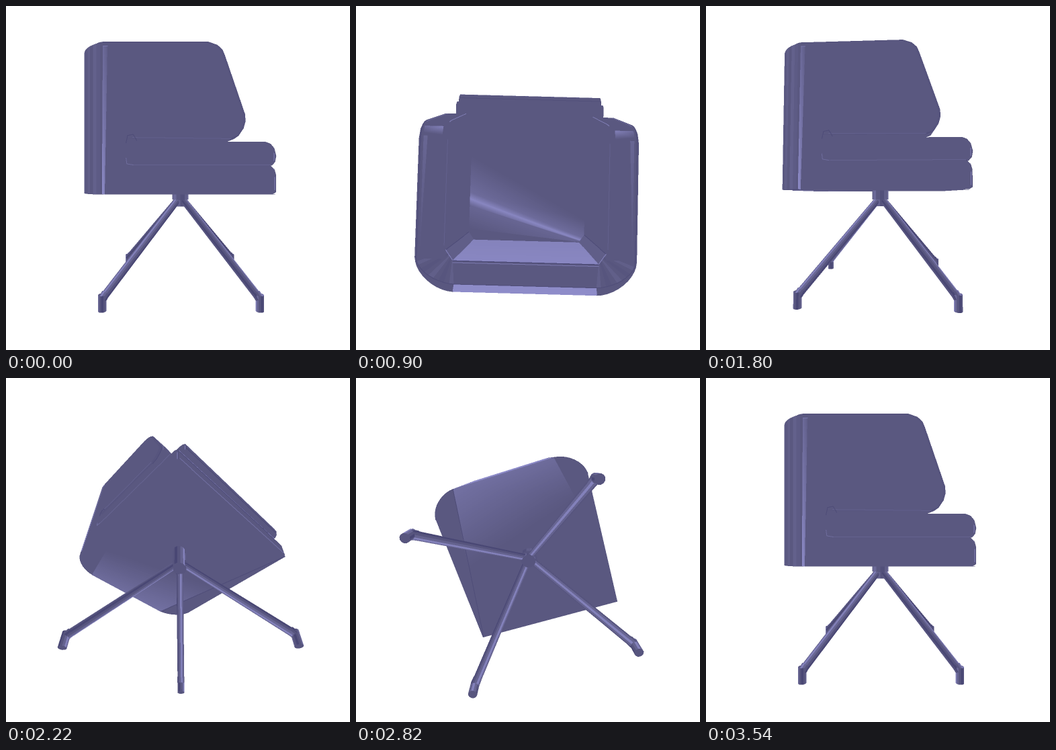
Animation of 512x512 px, one loop 3.6 s. Source, as an HTML page with a canvas:

```html
<!DOCTYPE html>
<html lang="en">
<head>
<meta charset="utf-8">
<title>Turning chair</title>
<style>
html, body { margin: 0; width: 100%; height: 100%; overflow: hidden; background: #fff; }
canvas { display: block; width: 512px; height: 512px; }
</style>
</head>
<body>
<canvas id="stage" width="512" height="512"></canvas>
<script>
const SIZE = 512, SS = 2, W = SIZE * SS;
const FOCAL = W / 2 / Math.tan(Math.PI / 6);
const LOOP = 3600, STEP = 60, LAST = LOOP / STEP - 1;

const view = document.getElementById('stage').getContext('2d');
const big = document.createElement('canvas');
big.width = big.height = W;
const bigCtx = big.getContext('2d');
const image = bigCtx.createImageData(W, W);
const pixels = new Uint32Array(image.data.buffer);
const near = new Float32Array(W * W);

// Shades run from -1 (dark edge) over 0 (body) to 1 (lit panel)
const DARK = [62, 60, 108], BODY = [90, 88, 128], LIT = [145, 143, 205];
const ramp = new Uint32Array(201);
for (let i = 0; i <= 200; i++) {
  const s = (i - 100) / 100, end = s < 0 ? DARK : LIT;
  const [r, g, b] = BODY.map((c, k) => Math.round(c + (end[k] - c) * Math.abs(s)));
  ramp[i] = (255 << 24 | b << 16 | g << 8 | r) >>> 0;
}

const tris = [], lines = [];

function poly(pts, shade) {
  const at = i => Array.isArray(shade) ? shade[i] : shade;
  for (let i = 1; i < pts.length - 1; i++)
    tris.push([pts[0], pts[i], pts[i + 1], at(0), at(i), at(i + 1)]);
}

function line(pts, shade, width = 1) {
  for (let i = 1; i < pts.length; i++) lines.push([pts[i - 1], pts[i], shade, width]);
}

// Joins two profiles of (x, y) points at depths z0 and z1
function band(from, to, z0, z1, shade) {
  from.forEach(([x, y], i) => {
    const j = (i + 1) % from.length;
    poly([[x, y, z0], [...from[j], z0], [...to[j], z1], [...to[i], z1]], shade);
  });
}

function slab(profile, z0, z1, shade) {
  for (const z of [z0, z1]) poly(profile.map(p => [...p, z]), shade);
  band(profile, profile, z0, z1, shade);
}

function tube(a, b, r, shades, closed) {
  const sub = (p, q) => p.map((v, i) => v - q[i]);
  const cross = (p, q) => [p[1] * q[2] - p[2] * q[1], p[2] * q[0] - p[0] * q[2], p[0] * q[1] - p[1] * q[0]];
  const unit = p => p.map(v => v / Math.hypot(...p));
  const axis = unit(sub(b, a));
  const side = unit(cross(axis, Math.abs(axis[1]) > 0.95 ? [1, 0, 0] : [0, 1, 0]));
  const up = cross(side, axis), n = 12;
  const ring = c => Array.from({ length: n }, (_, i) => {
    const t = i / n * 2 * Math.PI;
    return c.map((v, k) => v + r * (Math.cos(t) * side[k] + Math.sin(t) * up[k]));
  });
  const p = ring(a), q = ring(b);
  for (let i = 0; i < n; i++) {
    const j = (i + 1) % n;
    poly([p[i], p[j], q[j], q[i]], shades[i % shades.length]);
  }
  if (closed) poly(q, -0.1);
}

const TOP = 0.349, FLOOR = -0.042, OUT = 0.243, IN = 0.174, SHOULDER = TOP - 0.006;
const BACK = -0.262, BEND = -0.19, PANEL = 0.158, INNER = -0.193;

function buildArm(k) {
  const nose = [[0.135, 0.1], [0.155, 0.108], [0.168, 0.127], [0.173, 0.145], [0.172, 0.163],
    [0.12, 0.315], [0.114, 0.329], [0.101, 0.341], [0.078, TOP]];
  const profile = [[BEND, 0.1], ...nose, [BEND, TOP]];
  const inset = profile.map(([x, y]) => [BEND + (x - BEND) * 0.98, 0.1 + (y - 0.1) * 0.98]);
  const rim = OUT - 0.006;
  slab(profile, k * IN, k * rim, 0);
  band(profile, inset, k * rim, k * OUT, -0.1);
  poly(inset.map(p => [...p, k * OUT]), 0);
  slab([[BEND, FLOOR], [-0.13, FLOOR], [-0.13, 0.1], [BEND, 0.1]], k * IN, k * OUT, 0);

  const edge = (z, from, to) => nose.slice(from, to).map(([x, y]) => [x, y, k * z]);
  line(edge(rim, 0, 9), -0.4);
  line(edge(IN + 0.006, 1, 7), 0.7);
  line(edge(rim - 0.006, 3, 7), 0.35);
  // Glints where the top rolls over into the front
  poly([[0.101, 0.342, k * 0.19], [0.101, 0.342, k * 0.232], [0.085, 0.3475, k * 0.232],
    [0.08, 0.349, k * 0.19]], [0.75, 0.35, 0, 0]);
  poly([[0.078, TOP + 0.0005, k * 0.222], [0.078, TOP + 0.0005, k * 0.231],
    [BEND, TOP + 0.0005, k * 0.231]], [0.25, 0.25, 0]);
  line([[-0.16, TOP, k * (IN + 0.004)], [0.07, TOP, k * (IN + 0.004)]], 0.15);
  line([[BEND, TOP, k * rim], [0.078, TOP, k * rim]], -0.35);
  line([[-0.115, 0.103, k * OUT], [0.135, 0.1, k * OUT]], 0.15);
  line([[-0.105, 0.096, k * OUT], [-0.114, 0.111, k * OUT], [-0.128, 0.108, k * OUT],
    [-0.132, 0.09, k * OUT]], -0.4);
  line([[-0.132, 0.05, k * OUT], [-0.13, 0.036, k * OUT], [-0.113, 0.033, k * OUT]], 0.35);

  const z = k * (OUT + 0.0007);
  poly([[BEND - 0.001, 0.335, z], [BEND + 0.011, 0.335, z], [BEND + 0.004, FLOOR, z],
    [BEND - 0.003, FLOOR, z]], [0.35, 0.1, 0.7, 1]);
  line([[BEND, 0.335, z], [BEND + 0.011, 0.335, z]], 0.5);
}

function buildBack() {
  const n = 10;
  const corner = k => Array.from({ length: n + 1 }, (_, i) => {
    const t = i / n * Math.PI / 2, bow = v => Math.pow(Math.max(v, 0), 1.15);
    return [BEND + (BACK - BEND) * bow(Math.sin(t)), k * (PANEL + (OUT - PANEL) * bow(Math.cos(t)))];
  });
  const at = ([x, z], y) => [x, y, z];
  // The flat top is a little smaller than the shell below it
  const shrink = ([x, z]) => [BEND + (x - BEND) * 0.74, z * 0.977];
  for (const k of [1, -1]) {
    const arc = corner(k), lid = arc.map(shrink);
    const inside = i => [-0.17 + (INNER + 0.17) * i / n, k * (IN + (PANEL - IN) * i / n)];
    for (let i = 0; i < n; i++) {
      const a = arc[i], b = arc[i + 1], c = inside(i), d = inside(i + 1), j = i + 1;
      poly([at(a, FLOOR), at(b, FLOOR), at(b, SHOULDER), at(a, SHOULDER)], [0, 0.06, 0.16, 0, 0.1][i % 5]);
      poly([at(a, SHOULDER), at(b, SHOULDER), at(lid[j], TOP), at(lid[i], TOP)], -0.05);
      poly([at(lid[i], TOP), at(lid[j], TOP), at(d, TOP), at(c, TOP)], [0, 0.12, 0, -0.1][i % 4]);
    }
    poly([at(lid[0], TOP), [-0.17, TOP, k * 0.237], [-0.17, TOP, k * IN]], 0);
    poly([[-0.17, 0.05, k * IN], [INNER, 0.05, k * PANEL], [INNER, TOP, k * PANEL], [-0.17, TOP, k * IN]], 0.1);
    line([[INNER, TOP, k * PANEL], [INNER, 0.1, k * PANEL]], 0.8);
    line([[-0.17, TOP, k * IN], [-0.17, 0.1, k * IN]], -0.4);
    line([[-0.17, TOP, k * IN], [INNER, TOP, k * PANEL]], 0.7);
    line(lid.map(p => at(p, TOP)), -0.35);
    line(arc.map(p => at(p, FLOOR)), -0.3);
    line([[BACK, SHOULDER, k * PANEL], [BACK, FLOOR, k * PANEL]], -0.5);
  }
  const wall = (x, top) => [[x, FLOOR, -PANEL], [x, FLOOR, PANEL], [x, top, PANEL], [x, top, -PANEL]];
  poly(wall(BACK, SHOULDER), [0.9, 0.78, 1, 1]);
  poly(wall(INNER, TOP), [0.75, 0.75, 0.85, 0.85]);
  const [lip, end] = shrink([BACK, PANEL]);
  poly([[BACK, SHOULDER, -PANEL], [BACK, SHOULDER, PANEL], [lip, TOP, end], [lip, TOP, -end]], 0.95);
  poly([[lip, TOP, -end], [lip, TOP, end], [INNER, TOP, PANEL], [INNER, TOP, -PANEL]], 0);
  line([[INNER, TOP, -PANEL], [INNER, TOP, PANEL]], -0.6);
  line([[INNER - 0.004, TOP, -PANEL], [INNER - 0.004, TOP, PANEL]], 0.6);
  line([[lip, TOP, -end], [lip, TOP, end]], -0.4);

  const under = [[0.25, 0.241], ...corner(1), ...corner(-1).reverse(), [0.25, -0.241]];
  poly(under.map(p => at(p, FLOOR)), 0);
  const y = FLOOR - 0.001;
  poly([[BACK, y, -PANEL], [BACK, y, PANEL], [-0.13, y, 0.19], [-0.01, y, -0.2]], [0.45, 0.35, 0, 0]);
  line([[BACK, y, -PANEL], [0.25, y, -0.238]], -0.35);
}

function buildSeat() {
  const cushion = [[-0.2, 0.033], [0.247, 0.033], [0.255, 0.042], [0.258, 0.058],
    [0.253, 0.078], [0.243, 0.09], [0.23, 0.095], [-0.2, 0.095]];
  const base = [[-0.2, -0.041], [0.242, -0.041], [0.25, -0.036], [0.25, 0.008],
    [0.246, 0.022], [0.235, 0.032], [-0.2, 0.032]];
  const soft = 0.218, hard = 0.241;
  slab(cushion, -soft, soft, 0);
  slab(base, -hard, hard, 0);

  const across = (x, y, z, s) => line([[x, y, -z], [x, y, z]], s);
  across(0.255, 0.074, soft, 0.6);
  across(0.238, 0.093, soft, -0.3);
  across(0.257, 0.045, soft, -0.5);
  across(0.246, 0.022, 0.238, 0.7);
  across(0.251, 0.005, 0.238, -0.4);
  across(0.251, -0.03, 0.238, 0.4);
  for (const k of [1, -1]) {
    const zs = k * (soft + 0.001), zh = k * (hard + 0.001);
    line([[-0.11, 0.033, zh], [0.235, 0.033, zh]], 0.2);
    line(cushion.slice(2, 7).map(p => [...p, zs]), -0.4);
    line(base.slice(2, 6).map(p => [...p, zh]), -0.4);
    line([[0.246, -0.03, zh], [0.246, 0.002, zh]], 0.7);
    line([[0.252, 0.046, zs], [0.252, 0.065, zs]], 0.7);
  }

  // A slanting sheen across the seat: offset along x, shade
  const sheen = [[-0.09, 0], [-0.02, 0.25], [0, 0.85], [0.02, 0.35], [0.13, 0]];
  const y = 0.0957;
  const row = d => [[-0.07 + d, y, -IN], [Math.max(-0.19 + d * 0.5, INNER), y, IN]];
  for (let i = 1; i < sheen.length; i++) {
    const [d, s] = sheen[i - 1], [e, t] = sheen[i];
    poly([...row(d), ...row(e).reverse()], [s, s, t, t]);
  }
}

function buildLegs() {
  const x0 = 0.008, spread = 0.209;
  const stripes = [-0.6, -0.1, 0.2, 0.75, 0.25, -0.1];
  tube([x0, FLOOR, 0], [x0, -0.072, 0], 0.027, [-0.3, 0.1, 0.3, 0], true);
  tube([x0, -0.07, 0], [x0, -0.094, 0], 0.021, [-0.2, 0, 0.2], true);
  for (const i of [1, -1]) for (const k of [1, -1]) {
    const to = (d, y) => [x0 + i * d, y, k * d];
    tube(to(0.012, -0.077), to(spread - 0.006, -0.313), 0.0108, stripes);
    tube(to(spread - 0.008, -0.308), to(spread, -0.322), 0.0115, stripes, true);
    tube(to(spread, -0.31), to(spread, -0.353), 0.0112, stripes, true);
  }
}

for (const k of [1, -1]) buildArm(k);
buildBack();
buildSeat();
buildLegs();

// The camera turns and climbs by the same angle; past the pole it stays upright
function camera(angle) {
  let turn = angle, tilt = angle;
  if (Math.cos(tilt) < 0) { turn += Math.PI; tilt = Math.PI - tilt; }
  const ct = Math.cos(turn), st = Math.sin(turn), ce = Math.cos(tilt), se = Math.sin(tilt);
  return ([x, y, z]) => {
    const right = x * ct - z * st, toward = x * st + z * ct;
    const inv = 1 / (1 - toward * ce - y * se);
    return [W / 2 + FOCAL * right * inv, W / 2 - FOCAL * (y * ce - toward * se) * inv, inv];
  };
}

const tone = s => ramp[Math.max(0, Math.min(200, Math.round(100 + s * 100)))];

function fill(a, b, c, sa, sb, sc) {
  const area = (b[0] - a[0]) * (c[1] - a[1]) - (b[1] - a[1]) * (c[0] - a[0]);
  if (Math.abs(area) < 1e-6) return;
  const lo = k => Math.max(0, Math.floor(Math.min(a[k], b[k], c[k])));
  const hi = k => Math.min(W - 1, Math.ceil(Math.max(a[k], b[k], c[k])));
  const x0 = lo(0), x1 = hi(0), y1 = hi(1), flat = sa === sb && sb === sc, ink = tone(sa);
  for (let y = lo(1); y <= y1; y++) {
    const py = y + 0.5;
    for (let x = x0; x <= x1; x++) {
      const px = x + 0.5;
      const u = ((b[0] - px) * (c[1] - py) - (b[1] - py) * (c[0] - px)) / area;
      if (u < 0) continue;
      const v = ((c[0] - px) * (a[1] - py) - (c[1] - py) * (a[0] - px)) / area;
      const w = 1 - u - v;
      if (v < 0 || w < 0) continue;
      const inv = u * a[2] + v * b[2] + w * c[2], i = y * W + x;
      if (inv <= near[i]) continue;
      near[i] = inv;
      pixels[i] = flat ? ink : tone(u * sa + v * sb + w * sc);
    }
  }
}

function stroke(a, b, shade, width) {
  const n = Math.ceil(Math.max(Math.abs(b[0] - a[0]), Math.abs(b[1] - a[1]), 1));
  const size = width * SS, ink = tone(shade);
  for (let k = 0; k <= n; k++) {
    const t = k / n, inv = (a[2] + (b[2] - a[2]) * t) * 1.005;
    const x = Math.round(a[0] + (b[0] - a[0]) * t - size / 2);
    const y = Math.round(a[1] + (b[1] - a[1]) * t - size / 2);
    for (let j = 0; j < size; j++) for (let m = 0; m < size; m++) {
      const i = (y + j) * W + x + m;
      // Only paint on top of the body, never past its outline
      if (near[i] > 0 && inv > near[i]) pixels[i] = ink;
    }
  }
}

function draw(step) {
  const project = camera(step / LAST * 2 * Math.PI);
  pixels.fill(0xffffffff);
  near.fill(0);
  for (const [a, b, c, ...s] of tris) fill(project(a), project(b), project(c), ...s);
  for (const [a, b, s, w] of lines) stroke(project(a), project(b), s, w);
  bigCtx.putImageData(image, 0, 0);
  view.drawImage(big, 0, 0, SIZE, SIZE);
}

let shown = -1;
const start = performance.now();
function tick() {
  const step = Math.floor((performance.now() - start) % LOOP / STEP);
  if (step !== shown) draw(shown = step);
  requestAnimationFrame(tick);
}
tick();
</script>
</body>
</html>
```
